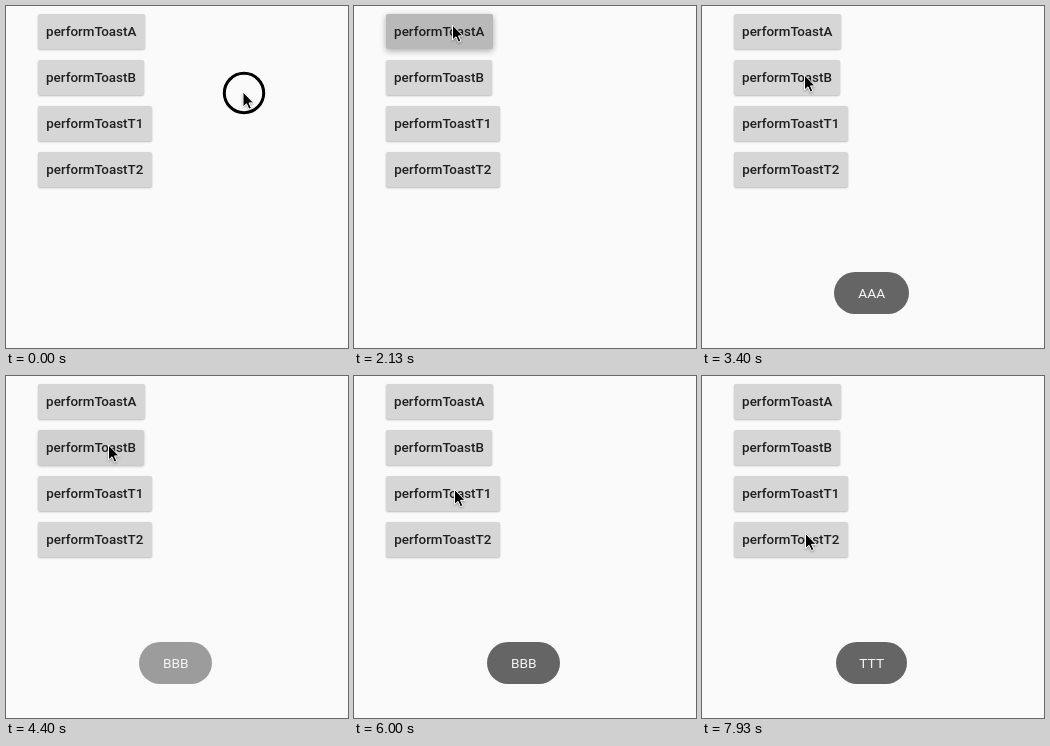
An HTML page for the animation above (8000 ms loop, 342x342 px).

```html
<!DOCTYPE html>
<html lang="en">
<head>
<meta charset="utf-8">
<title>Toast buttons</title>
<style>
html, body { margin: 0; width: 100%; height: 100%; overflow: hidden; background: #fafafa; }
body { position: relative; font-family: Roboto, sans-serif; }
.button, .toast, svg { position: absolute; }
.button {
  left: 32px; height: 35px; border-radius: 2px; background-color: #d6d6d6;
  color: #1f1f1f; font-size: 13.42px; font-weight: 500; line-height: 35px;
  text-align: center; white-space: nowrap;
}
.toast {
  top: 266px; height: 42px; border-radius: 21px; background: #656565;
  color: #f4f4f4; font-size: 13.7px; line-height: 43px; text-align: center;
}
svg { left: 0; top: 0; width: 342px; height: 342px; }
#arrow { filter: drop-shadow(0 1px 1px #0005); }
</style>
</head>
<body>
<svg viewBox="0 0 342 342" style="z-index:1">
  <circle id="ring" cx="238" cy="87" r="19.7" fill="none" stroke="#000" stroke-width="3"/>
  <path id="arrow" d="M0 0V15L3.5 11.8L5.9 17.2L8.4 16.1L6 10.9H10.6Z" stroke="#fff" stroke-width="1"/>
</svg>
<script>
const LOOP = 8000;
const clamp = v => Math.max(0, Math.min(1, v));
const ramp = (t, from, to) => clamp((t - from) / (to - from));
const easeOut = v => 1 - (1 - v) ** 2;

function box(className, text, style) {
  const el = document.createElement('div');
  el.className = className;
  el.textContent = text;
  Object.assign(el.style, style);
  document.body.append(el);
  return el;
}

// press: start of the touch, release: start of the ripple's fade
const buttons = [
  { text: 'performToastA', width: 106.5, press: 1800, release: 2200, x: 67 },
  { text: 'performToastB', width: 106, press: 3730, release: 4080, x: 71 },
  { text: 'performToastT1', width: 113.5, press: 6270, release: 6620, x: 69 },
  { text: 'performToastT2', width: 113.5 }
];
buttons.forEach((b, i) => {
  b.el = box('button', b.text, { top: 8 + 46 * i + 'px', width: b.width + 'px' });
});

const toasts = [
  { text: 'AAA', width: 75, show: [2140, 2620], hide: [4000, 4430] },
  { text: 'BBB', width: 72.6, show: [4210, 4710], hide: [6440, 6760] },
  { text: 'TTT', width: 71.6, show: [6590, 7070], hide: [9000, 9500] }
];
for (const o of toasts) {
  o.el = box('toast', o.text, { left: 169.7 - o.width / 2 + 'px', width: o.width + 'px' });
}

// cursor tip: time, x, y
const path = [
  [70, 237, 86], [330, 178, 42], [600, 127, 19.5], [870, 98.5, 19],
  [2670, 98.5, 19], [3330, 102.5, 69],
  [5330, 102.5, 69], [5580, 79, 98], [5820, 112, 119], [6000, 100.5, 113.5],
  [7530, 100.5, 113.5], [7930, 103.5, 157.5]
];

function tip(t) {
  const next = path.findIndex(p => p[0] > t);
  if (next < 0) return path.at(-1).slice(1);
  if (!next) return path[0].slice(1);
  const [a, b] = [path[next - 1], path[next]];
  let k = ramp(t, a[0], b[0]);
  if (b[0] > 900) k = k * k * (3 - 2 * k);
  return [a[1] + (b[1] - a[1]) * k, a[2] + (b[2] - a[2]) * k];
}

function drawButton(b, t) {
  const fade = 1 - ramp(t, b.release, b.release + 400);
  const down = b.press ? ramp(t, b.press, b.press + 200) * fade : 0;
  const spread = b.press ? 120 * easeOut(ramp(t, b.press, b.press + 350)) : 0;
  const tint = `rgba(0,0,0,${0.07 * down})`;
  b.el.style.backgroundImage =
    `radial-gradient(circle at ${b.x || 0}px 18px, ${tint} ${spread}px, transparent ${spread + 1}px),` +
    `linear-gradient(${tint}, ${tint})`;
  b.el.style.boxShadow = `0 ${1 + down}px ${2 + 4 * down}px rgba(0,0,0,${0.26 + 0.06 * down})`;
}

const ring = document.getElementById('ring');
const arrow = document.getElementById('arrow');
const start = performance.now();

function draw(now) {
  const t = Math.max(0, now - start) % LOOP;
  buttons.forEach(b => drawButton(b, t));
  for (const { el, show, hide } of toasts) {
    el.style.opacity = easeOut(ramp(t, ...show)) * (1 - easeOut(ramp(t, ...hide)));
  }
  ring.style.display = t < 70 ? '' : 'none';
  arrow.setAttribute('transform', `translate(${tip(t)})`);
  requestAnimationFrame(draw);
}
draw(start);
</script>
</body>
</html>
```
